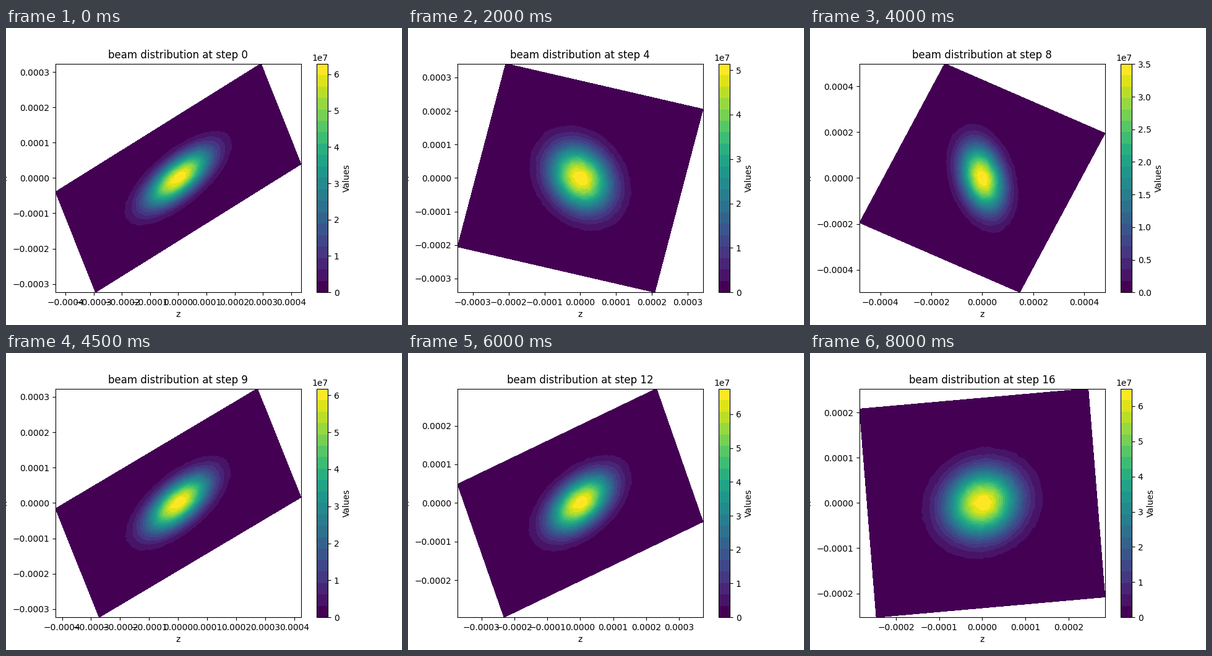
Recreate the animation shown at these times as a matplotlib script. Size 640x480 px, loop 8.5 s.

```python
import numpy as np
import matplotlib.pyplot as plt
from matplotlib.animation import FuncAnimation
from matplotlib.colors import Normalize

STEPS = 17
INTERVAL = 500
BANDS = 20
GRID = 200
UNIT = 1e-4
REACH = 1.9          # grid half-width relative to the outermost contour
CHARGE = 11.05e7     # peak density times beam area

# step: half-length, half-width and slope of the grid (lengths in UNIT)
START = (3.640, 1.422, 0.4985)
DRIFT = {2: (2.634, 2.469, -0.0415),
         4: (2.7565, 2.734, -0.2465),
         8: (3.143, 3.466, -0.4825)}
BEND = {10: (3.305, 1.575, 0.478),
        14: (2.802, 1.966, 0.2785),
        16: (2.652, 2.3045, 0.0845)}


def smooth_noise(size, width, seed=4):
    noise = np.random.default_rng(seed).normal(size=(size, size))
    kernel = np.hanning(width + 2)[1:-1]
    for axis in (0, 1):
        noise = np.apply_along_axis(np.convolve, axis, noise, kernel, "same")
    return noise / noise.std()


def quadratic(knots, step):
    """Parabola through three known steps, for every parameter."""
    coeffs = np.polyfit(list(knots), np.array(list(knots.values())), 2)
    return coeffs[0] * step**2 + coeffs[1] * step + coeffs[2]


def beam_shape(step):
    if step < 2:
        return START
    return quadratic(DRIFT if step < 9 else BEND, step)


P, Q = np.meshgrid(np.linspace(-1, 1, GRID), np.linspace(-1, 1, GRID))
NOISE = smooth_noise(GRID, 5)
CMAP = plt.get_cmap("viridis", BANDS)

fig = plt.figure(figsize=(6.4, 4.8), dpi=100)


def draw(step):
    fig.clear()
    ax = fig.add_subplot()
    length, width, slope = beam_shape(step)

    # sheared grid and the tilted Gaussian on it
    z = length * P - slope * width * Q
    x = slope * length * P + width * Q
    size_z = np.sqrt(length**2 - (slope * width)**2) / REACH
    size_x = width * (1 + slope**2) / REACH
    radius2 = (z / size_z)**2 + ((x - slope * z) / size_x)**2
    density = np.exp(-np.log(BANDS) * radius2)
    density += 0.010 * np.sqrt(density) * NOISE
    peak = CHARGE / (size_z * size_x)
    density = peak * np.clip(density, 1e-6, 0.9999)

    ax.contourf(z * UNIT, x * UNIT, density, np.linspace(0, peak, BANDS + 1),
                cmap=CMAP, vmin=0, vmax=peak)
    half_z = (length + abs(slope) * width) * UNIT
    half_x = (abs(slope) * length + width) * UNIT
    ax.set_xlim(-half_z, half_z)
    ax.set_ylim(-half_x, half_x)
    ax.set_xlabel("z")
    ax.set_ylabel("x")
    ax.set_title(f"beam distribution at step {step}")

    scale = plt.cm.ScalarMappable(Normalize(0, peak), CMAP)
    fig.colorbar(scale, ax=ax, label="Values")
    return []


anim = FuncAnimation(fig, draw, frames=STEPS, interval=INTERVAL,
                     init_func=lambda: [], repeat=True, repeat_delay=0)
plt.show()
```
